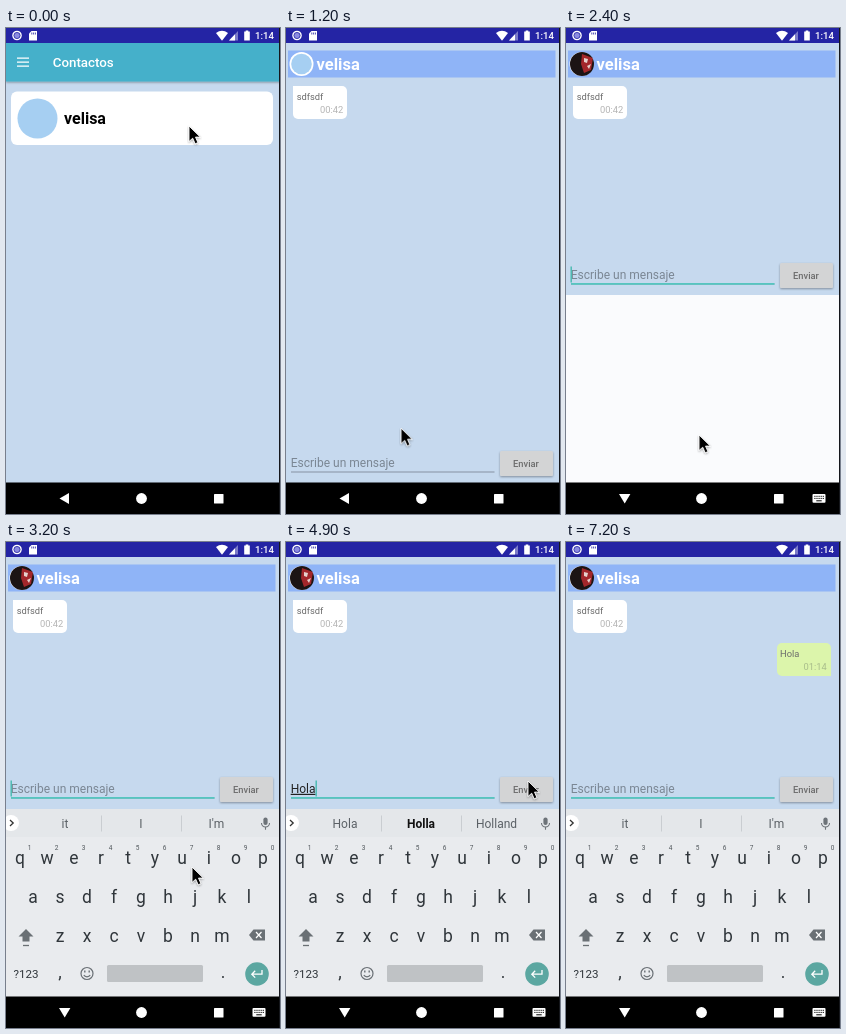
An HTML page for the animation above (7.3 s loop, 274 by 486 pixels).

```html
<!DOCTYPE html>
<html lang="es">
<head>
<meta charset="utf-8">
<title>Chat</title>
<style>
html, body { margin: 0; width: 100%; height: 100%; overflow: hidden; background: #000; }
svg { display: block; width: 274px; height: 486px; font-family: Roboto, sans-serif; }
.mid { text-anchor: middle; }
.bold { font-weight: 700; }
.medium { font-weight: 500; }
.key { font-size: 17.5px; fill: #30363b; }
.hint { font-size: 6.5px; fill: #50565b; }
.word { font-size: 12px; fill: #5b6166; }
.msg { font-size: 9.33px; fill: #6c6c6c; }
</style>
</head>
<body>
<svg viewBox="0 0 274 486">
  <defs>
    <clipPath id="face"><circle cx="16" cy="36" r="12"/></clipPath>
    <filter id="soft" x="-10%" y="-20%" width="120%" height="150%">
      <feDropShadow dx="0" dy="1" stdDeviation=".8" flood-opacity=".35"/>
    </filter>
    <filter id="blur"><feGaussianBlur stdDeviation=".7"/></filter>
  </defs>

  <g id="contacts">
    <rect y="15" width="274" height="440" fill="#c6d9ee"/>
    <rect y="15" width="274" height="38.5" fill="#45b0ca" filter="url(#soft)"/>
    <path d="M11 30.2h12M11 34.2h12M11 38.2h12" stroke="#fff" stroke-width="1.3"/>
    <text class="medium" x="46.7" y="39.2" font-size="13.33" fill="#fff">Contactos</text>
    <rect x="5" y="63.5" width="262" height="53.5" rx="6" fill="#fff"/>
    <circle cx="31.5" cy="90.5" r="20" fill="#a6cff2"/>
    <text class="bold" x="58" y="96" font-size="16" fill="#000">velisa</text>
  </g>

  <g id="chat">
    <rect y="15" width="274" height="440" fill="#c6d9ee"/>
    <rect x="2" y="22.5" width="267.5" height="27" fill="#8fb4f7"/>
    <circle cx="15.5" cy="36" r="12" fill="#fff"/>
    <circle cx="15.5" cy="36" r="10.3" fill="#a6cff2"/>
    <g id="photo" clip-path="url(#face)">
      <rect x="3" y="23" width="26" height="26" fill="#1c1414"/>
      <g filter="url(#blur)">
        <path d="M16 26l11 4-2 12-7 3-3-9z" fill="#a3272b"/>
        <path d="M18 30l4 1-1 4-3-1zM21 38l4-2-2 5z" fill="#e6d2cd"/>
      </g>
    </g>
    <text class="bold" x="30.5" y="42.3" font-size="16.5" fill="#fff">velisa</text>
    <path d="M7 58h49a5 5 0 0 1 5 5v23a5 5 0 0 1-5 5H12a5 5 0 0 1-5-5z" fill="#fff"/>
    <text class="msg" x="10.7" y="72">sdfsdf</text>
    <text class="msg" x="34" y="84.6" style="fill:#b4b4b4">00:42</text>
    <g id="sent">
      <path d="M216 101h44a5 5 0 0 1 5 5v28h-49a5 5 0 0 1-5-5v-23a5 5 0 0 1 5-5z" fill="#dcf5ab"/>
      <text class="msg" x="214" y="114.7">Hola</text>
      <text class="msg" x="237.5" y="127.6" style="fill:#a9bd8b">01:14</text>
    </g>
    <rect id="blank" y="267" width="274" height="188" fill="#fafbfd"/>
    <g id="entry">
      <text id="prompt" x="4.7" y="250.8" font-size="12" fill="#7b8794">Escribe un mensaje</text>
      <g id="typed" font-size="12" fill="#222"></g>
      <rect x="5" y="255.5" width="203.5" height="1" fill="#8592a1"/>
      <g id="focus">
        <rect x="5" y="255" width="203.5" height="1.8" fill="#56c5c0"/>
        <rect id="caret" x="4.5" y="238.5" width="1.4" height="16" fill="#45b9ae"/>
      </g>
      <rect x="214" y="235" width="53" height="25" rx="1.5" fill="#d3d4d5" filter="url(#soft)"/>
      <rect id="press" x="213.5" y="235" width="54" height="25.5" rx="2" fill="#c4c5c6" stroke="#b4b8bb" stroke-width=".8"/>
      <text class="msg medium mid" x="240" y="251">Enviar</text>
    </g>
  </g>

  <g id="board">
    <rect y="267" width="274" height="188" fill="#e9ebee"/>
    <rect y="267" width="274" height="28" fill="#e4e7ea"/>
    <g id="words"></g>
    <circle cx="5" cy="281" r="8" fill="#fff"/>
    <path d="M4 278l3.2 3-3.2 3" fill="none" stroke="#333" stroke-width="1.3"/>
    <rect x="257.4" y="275.5" width="4.2" height="7.5" rx="2.1" fill="#6d7378"/>
    <path d="M255.5 281a4 4 0 0 0 8 0M259.5 285v2.7" fill="none" stroke="#6d7378" stroke-width="1.1"/>
    <g id="keys"></g>
    <path d="M20 387l7.5 7.5h-4v5h-7v-5h-4z" fill="#6a7075"/>
    <path d="M17 403.5h6" stroke="#6a7075" stroke-width="1.3"/>
    <path d="M243 393l4.5-5.5h11.5v11h-11.5z" fill="#6a7075"/>
    <path d="M250 390l5.5 6m0-6l-5.5 6" stroke="#fff" stroke-width="1.2"/>
    <g fill="none" stroke="#6a7075">
      <circle cx="81" cy="431.5" r="6" stroke-width="1.2"/>
      <path d="M77.8 433a3.5 3 0 0 0 6.4 0" stroke-width="1.2"/>
      <path d="M78.8 428.6v1.8m4.4-1.8v1.8" stroke-width="1.4"/>
    </g>
    <rect x="101" y="423" width="96" height="17" rx="1.5" fill="#bfc2c5"/>
    <circle cx="251" cy="432" r="11.8" fill="#5ba7a1"/>
    <path d="M256 428v4.2h-10m3.2-3.4l-3.4 3.4 3.4 3.4" fill="none" stroke="#fff" stroke-width="1.3"/>
  </g>

  <rect width="274" height="15" fill="#2424a4"/>
  <g fill="#fff">
    <circle cx="11" cy="7.5" r="4.8"/>
    <circle cx="11" cy="7.5" r="3.1" fill="#8b8be0" stroke="#2424a4" stroke-width=".8"/>
    <path d="M25.5 3h5.5v9.5h-8v-7z"/>
    <path d="M25.8 4.5v2m1.8-2v2m1.8-2v2" stroke="#2424a4" stroke-width=".8"/>
    <path d="M210 5q6-4.5 12 0l-6 7.7z"/>
    <path d="M232 3v9.5h-9z" opacity=".4"/>
    <path d="M229 6.2v6.3h-6z"/>
    <path d="M238.2 3.6h1.5v-1h2.6v1h1.5v9h-5.6z"/>
    <text class="medium" x="249" y="11.2" font-size="9.6">1:14</text>
  </g>

  <rect y="454.5" width="274" height="31.5" fill="#000"/>
  <g fill="#fff">
    <path id="back" d="M53.5 470.5l9.5-5.5v11z"/>
    <path id="down" d="M53 466h11.4l-5.7 9.6z"/>
    <circle cx="135.5" cy="470.5" r="5.4"/>
    <rect x="208" y="466" width="9.5" height="9.5" rx=".6"/>
    <g id="kbd">
      <rect x="246.5" y="466" width="13" height="8.8" rx="1"/>
      <path d="M248.3 468.3h9.6M248.3 470.4h9.6" stroke="#000" stroke-dasharray="1.2 .9"/>
      <path d="M250.3 472.8h5.4" stroke="#000"/>
    </g>
  </g>
  <rect x="273" width="1" height="486" fill="#15171c"/>

  <g id="mouse">
    <path d="M0 0V15.5L3.7 12.2 6.2 17.8 8.9 16.6 6.5 11.1H11.3Z" stroke="#fff" stroke-width=".9" filter="url(#soft)"/>
  </g>
</svg>
<script>
const LOOP = 7300;
const $ = id => document.getElementById(id);

function text(parent, x, y, str, cls, attrs = {}) {
  const el = document.createElementNS('http://www.w3.org/2000/svg', 'text');
  Object.entries({ x, y, class: cls, ...attrs }).forEach(([k, v]) => el.setAttribute(k, v));
  el.textContent = str;
  parent.append(el);
  return el;
}

function group(parent) {
  const el = document.createElementNS('http://www.w3.org/2000/svg', 'g');
  parent.append(el);
  return el;
}

// Steps are [ms, value]; values are held, or blended when an easing is given.
function play(el, prop, steps, easing = 'steps(1, end)') {
  const frames = steps.map(([ms, value, ease]) =>
    ({ offset: ms / LOOP, [prop]: value, easing: ease || easing }));
  frames.push({ offset: 1, [prop]: steps[steps.length - 1][1] });
  el.animate(frames, { duration: LOOP, iterations: Infinity });
}

// Visibility flips at each given time, starting hidden.
const toggle = (el, ...times) =>
  play(el, 'opacity', [[0, 0], ...times.map((ms, i) => [ms, (i + 1) % 2])]);

const move = (x, y) => `translate(${x}px, ${y}px)`;

// Keyboard
const keys = $('keys');
[['qwertyuiop', 14, 322], ['asdfghjkl', 27, 361], ['zxcvbnm', 54, 399.5]].forEach(([row, x, y], r) =>
  [...row].forEach((ch, i) => {
    text(keys, x + 27 * i, y, ch, 'key mid');
    if (!r) text(keys, x + 9.5 + 27 * i, 307.5, (i + 1) % 10, 'hint mid');
  }));
text(keys, 20, 436, '?123', 'key mid', { style: 'font-size:11.6px' });
text(keys, 54, 436, ',', 'key mid');
text(keys, 217, 436, '.', 'key mid');

function suggest(words, bold) {
  const g = group($('words'));
  words.forEach((w, i) => text(g, [59, 135, 210.5][i], 285.5, w, 'word mid',
    i === bold ? { style: 'font-weight:700;fill:#111' } : {}));
  const line = document.createElementNS('http://www.w3.org/2000/svg', 'path');
  line.setAttribute('d', 'M95.5 273.5v16M175.5 273.5v16');
  line.setAttribute('stroke', '#c9cdd1');
  g.append(line);
  return g;
}
toggle(suggest(['it', 'I', "I'm"]), 2600, 3900, 6200);
toggle(suggest(['Hola', 'Holla', 'Holland'], 1), 3900, 5400);

// Typing
[['H', 3600, 3800], ['Hol', 3800, 3900], ['Hola', 3900, 5400]].forEach(([str, from, to]) =>
  toggle(text($('typed'), 4.7, 250.8, str, '', { 'text-decoration': 'underline' }), from, to));
play($('prompt'), 'opacity', [[0, 1], [3600, 0], [5400, 1]]);
toggle($('focus'), 1600);
toggle($('caret'), 1600, 2500, 3000, 3500, 3600, 4400, 4900, 6100, 6600, 7100);
play($('caret'), 'transform', [[0, move(0, 0)], [3600, move(8.5, 0)], [3800, move(18.3, 0)],
  [3900, move(25, 0)], [5400, move(0, 0)]]);
toggle($('press'), 5100, 6200);
toggle($('sent'), 5400);

// Screens
play($('chat'), 'opacity', [[0, 0], [400, 0], [650, 1]], 'linear');
play($('chat'), 'transform', [[0, move(0, 30)], [400, move(0, 30), 'ease-out'], [700, move(0, 0)]], 'linear');
toggle($('photo'), 1400);
play($('entry'), 'transform', [[0, move(0, 188)], [2200, move(0, 0)]]);
toggle($('blank'), 2200);
toggle($('board'), 2500);
play($('board'), 'transform', [[0, move(0, 188)], [2450, move(0, 188), 'ease-out'], [2650, move(0, 0)]], 'linear');
play($('back'), 'opacity', [[0, 1], [2100, 0]]);
toggle($('down'), 2100);
toggle($('kbd'), 2100);

// Pointer
play($('mouse'), 'transform', [
  [0, move(183, 98)], [700, move(183, 98), 'ease-in-out'], [1200, move(115, 400), 'ease-out'],
  [1500, move(120, 428)], [2000, move(120, 428), 'ease-in-out'], [2400, move(133, 407)],
  [2700, move(144, 400)], [2900, move(186, 325)], [4600, move(186, 325), 'ease-in-out'],
  [4900, move(242, 239)], [5100, move(242, 239), 'ease-in'], [5300, move(278, 226)]
], 'linear');
</script>
</body>
</html>
```
